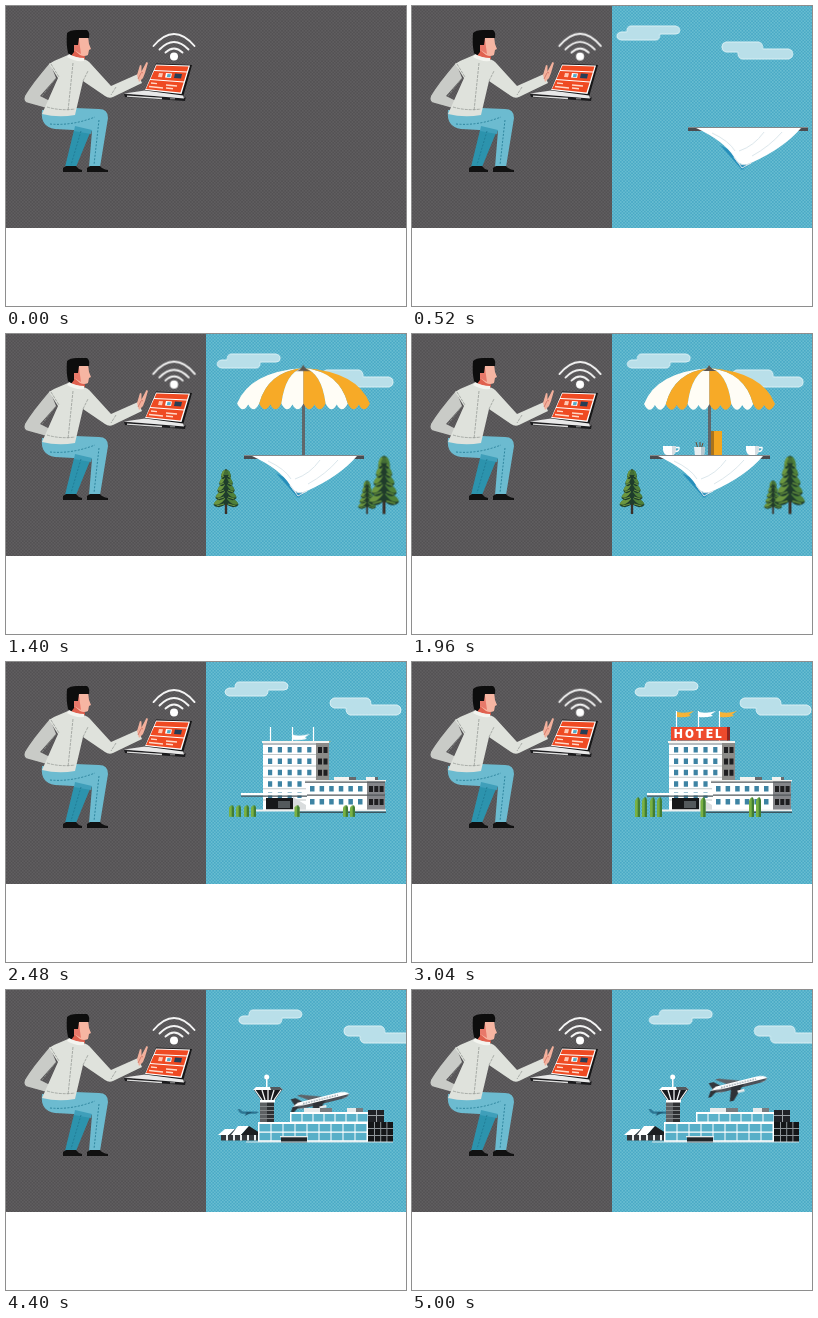
An HTML page that plays this animation: 400 by 300 pixels, repeating every 5.04 s.

```html
<!DOCTYPE html>
<html lang="en">
<head>
<meta charset="utf-8">
<title>Booking online</title>
<style>
html, body { margin: 0; width: 100%; height: 100%; overflow: hidden; background: #fff; }
svg { display: block; }
.grow, .pop { transform-box: fill-box; transform-origin: 50% 100%; }
#clouds { animation: drift 5040ms linear infinite; }
@keyframes drift { to { transform: translateX(36.500px); } }
#wifi { transform-origin: 168px 50px; animation: pulse 630ms ease-in-out infinite; }
@keyframes pulse { 50% { transform: scale(1.04); } }
text { font: 900 11.500px Inter, Arial, sans-serif; letter-spacing: 2.300px; }
</style>
</head>
<body>
<svg width="400" height="300" viewBox="0 0 400 300">
<defs>
  <pattern id="grayDots" width="3.200" height="3.200" patternUnits="userSpaceOnUse">
    <rect width="3.200" height="3.200" fill="#535153"/>
    <path d="M0 0h1.600v1.600H0zM1.600 1.600h1.600v1.600H1.600z" fill="#605e60"/>
  </pattern>
  <pattern id="blueDots" width="3.200" height="3.200" patternUnits="userSpaceOnUse">
    <rect width="3.200" height="3.200" fill="#49a9c5"/>
    <path d="M0 0h1.600v1.600H0zM1.600 1.600h1.600v1.600H1.600z" fill="#69bdd1"/>
  </pattern>
  <clipPath id="half"><rect x="200" width="200" height="222"/></clipPath>
  <g id="tree"></g>
  <g id="cup">
    <path d="M0 0h13v4q-1 5-4 5H4q-3 0-4-5z" fill="#fff"/>
    <path d="M13 1.500h3q1 4-4 4" fill="none" stroke="#fff" stroke-width="1.300"/>
    <path d="M9 0h4v4q-1 5-4 5z" fill="#d5dee3"/>
    <path d="M-2 9h17l-3 1.500H1z" fill="#f3f5f5"/>
  </g>
  <g id="shrub"><path d="M0 20V4q2.500-7 5 0v16z" fill="#79b143"/><path d="M2.700 20V0q1.800 0 2.300 4v16z" fill="#417d35"/></g>
  <path id="flag" d="M0 0q8 2 17-1l-5 3.500 2 1.500q-8 2-14 1z"/>
</defs>

<rect width="400" height="222" fill="url(#grayDots)"/>

<g id="man">
  <path d="M69 120l17 2-16 39H59z" fill="#2c93ad"/>
  <path d="M36 104q-2 17 13 19l37 2-3 36h11l8-49q0-9-9-9l-24-1z" fill="#6cbbd0"/>
  <path d="M69 120l17 4-1 4-17-3z" fill="#3f9fba"/>
  <path d="M75 125l-10 34M93 114l-5 45M44 118q22 2 45-7" fill="none" stroke="#1f7891" stroke-width=".8" stroke-dasharray="2 1.500"/>
  <path d="M57 166v-4l3-2h10q2 3 6 4v2zM81 166v-4l3-2h10q2 3 8 4v2z" fill="#111"/>
  <path d="M65 44h13l1 9-13 1z" fill="#e0614f"/>
  <path d="M68 30h14l1 8 2 5-2 1-1 5q-4 2-8 0l-6-5z" fill="#f6b5a2"/>
  <path d="M68 34h5l2 14-7-4z" fill="#e8796a"/>
  <path d="M61 27q3-3 10-3h10q3 2 2 8H73l-1 7h-4v7l-3 4-3-3q-2-9-1-20z" fill="#0d0d0d"/>
  <path d="M44 57Q26 78 19 90q-2 6 4 7l18 5 5-6-12-6 16-18z" fill="#c9cbc7"/>
  <path d="M62 49l-14 6-5 3 9 14-16 36q16 4 33 1l8-34 22 15q4 3 8 1l29-14-4-9-27 12-20-22q-3-4-8-5z" fill="#dfe2dc"/>
  <path d="M63 48l-2 3q8 5 17 4v-3q-8 0-15-4z" fill="#f3f4ef"/>
  <path d="M50 72L36 90M77 75l5-10M67 57l-5 48M110 81l-5 8M41 101q13 4 28 2M45 58l8 13" fill="none" stroke="#8f928e" stroke-width=".7" stroke-dasharray="3 1"/>
  <path d="M131 69l3-10 1.500.4v6l5-9.400 1.500.7-3 10.300-2 5-4 4z" fill="#f3b09c"/>
  <path d="M132 73l3-6M135 66l2 1" stroke="#c9685a" stroke-width=".7"/>
</g>

<g id="laptop">
  <path d="M150 57.500l36 1.500-9 32-39-5z" fill="#161617"/>
  <path d="M150 58.500l34 1-8.500 28.500-36.500-4z" fill="#fff"/>
  <path d="M150.500 59.500l32 1-8 26-34.500-3.500z" fill="#ef4a22"/>
  <path d="M148 64.500l33 1.500M144 73.500l34 2.500" stroke="#fff" stroke-width="1.200"/>
  <path d="M153 67l4 .3-1 4-4-.4z" fill="#ffc7b2"/>
  <path d="M160 67l6 .4-1 4.500-6-.5z" fill="#fff"/>
  <path d="M161.500 68l3.500.3-.7 3-3.500-.4z" fill="#53aac7"/>
  <path d="M169 67.500l7 .5-1 4.500-7-.5z" fill="#263e56"/>
  <path d="M145 77l6 .6M143 80.500l14 1.500M160 79l11 1M160 82l7 .7" stroke="#ffd9c8" stroke-width="1.400"/>
  <path d="M118 88l61 4 1-2-1 5-60-4z" fill="#1b1b1d"/>
  <path d="M118 87.500l21-3 38 5 1 3z" fill="#e9e9e9"/>
  <path d="M121 90.200l35 2.300" stroke="#ddd" stroke-width="1.300"/>
  <path d="M164 92.800h5" stroke="#bbb" stroke-width=".8"/>
</g>

<g id="wifi" fill="none" stroke="#f4f4f4" stroke-width="1.900" stroke-linecap="round">
  <circle cx="168" cy="50.500" r="4" fill="#fff" stroke="none"/>
  <path d="M159.500 46.500q8.500-8 17 0M153.500 43.500q14.500-15 29 0M147.500 40q20.500-24 41 0"/>
</g>

<g clip-path="url(#half)">
<g id="panel">
  <rect x="200" width="200" height="222" fill="url(#blueDots)"/>

  <g id="clouds" fill="#b9dfe9" stroke="#d9eff4">
    <path d="M215 20h45q4 1 4 4 0 4-4 4h-16q0 6-4 6h-35q-4-1-4-4t4-4h6q0-6 4-6z"/>
    <path d="M310 36h33q4 1 4 7h26q4 1 4 5t-4 5h-47q-4-1-4-7h-12q-4-1-4-5t4-5z"/>
  </g>

  <g id="cafe">
    <g id="treeA" class="grow"><use href="#tree" transform="translate(220 180)"/></g>
    <g id="treeB" class="grow"><use href="#tree" transform="translate(361 180) scale(.72 .75)"/></g>
    <g id="treeC" class="grow"><use href="#tree" transform="translate(378 180) scale(1.200 1.300)"/></g>
    <g id="parasol" class="grow">
      <path d="M296 34h3v88h-3z" fill="#60676b"/>
      <g id="canopy"></g>
    </g>
    <g id="cap" class="pop"><path d="M290 37q5-1 7-6 3 5 8 6z" fill="#5c564e"/></g>
    <g id="goods" class="pop">
      <path d="M299 97h11v25h-11z" fill="#f2a51f"/><path d="M299 97h3v25h-3z" fill="#a9731c"/>
      <path d="M284 108l2 7m2-7v7m3-6l-2 6" stroke="#6d4b32"/>
      <path d="M282 113h11l-1 9h-9z" fill="#e9eff1"/><path d="M289 113h4l-1 9h-3z" fill="#b8c8cf"/>
      <use href="#cup" x="251" y="112"/><use href="#cup" x="334" y="112"/>
    </g>
    <g id="cloth">
      <path d="M238 121h120v4H238z" fill="#4b4c50"/>
      <path d="M238 121h120v1H238z" fill="#83878a"/>
      <path d="M270 139l22 25 10-8z" fill="#278fbb"/>
      <path d="M246 122h105q-17 20-50 35-11 5-17-6-10-16-38-29z" fill="#fff"/>
      <path d="M284 151q6 12 17 6l-9 5zM314 126q-10 14-25 19M332 126q-12 14-30 24M262 127q17 8 23 18" fill="none" stroke="#dce7ec"/>
    </g>
  </g>

  <g id="hotel">
    <g id="sign">
      <g id="poles"><path d="M264.500 49v32M286.500 49v32M307.500 49v32" stroke="#fff" stroke-width="1.200"/></g>
      <g id="flagsOuter" fill="#f6b338"><use href="#flag" x="265" y="50"/><use href="#flag" x="308" y="50"/></g>
      <g id="flagMid" fill="#fff"><use href="#flag" x="287" y="50"/></g>
      <path d="M259 65h57v13.500h-57z" fill="#ee4a2c"/><path d="M315 65h3v13.500h-3z" fill="#8e2520"/>
      <text x="262" y="76" fill="#fff">HOTEL</text>
    </g>
    <g id="block" class="grow">
      <path d="M309 80h14v67h-14z" fill="#8b8b88"/>
      <path d="M257 79h53v69h-53z" fill="#fff"/><path d="M256 79h67v2h-67z" fill="#f5f5f2"/>
      <path d="M257 81.500h53v1h-53z" fill="#6f7b82"/>
      <path data-grid="262 85 4.200 5.500 5 5 9.800 11.400" fill="#3d83a3"/>
      <path data-grid="257 92 53 1 1 5 0 11.400" fill="#c3c9ca"/>
      <path data-grid="312 85 4 6 2 3 5.500 11.400" fill="#1e1e20"/>
      <path d="M300 118h61v31h-61z" fill="#fff"/><path d="M361 118h18v31h-18z" fill="#85868a"/>
      <path d="M328 115h22v3h-22zM360 115h9v3h-9z" fill="#f3f3f0"/><path d="M343 115h7v3h-7zM369 115h3v3h-3z" fill="#66696c"/>
      <path d="M299 118h81v1.500h-81z" fill="#efefec"/><path d="M299 119.500h80v1.200h-80zM301 132.500h78v1.200h-78z" fill="#53585c"/>
      <path data-grid="304 124 4.500 5.500 6 2 9.600 13" fill="#3d83a3"/>
      <path data-grid="363 124 4 6 3 2 5.300 13" fill="#1e1e20"/>
      <path d="M235 131h66v2.500h-66z" fill="#fff"/><path d="M235 133.500h66v1.200h-66z" fill="#47545b"/>
      <path d="M260 136h27v11.500h-27z" fill="#17181a"/><path d="M272 139h12v7h-12z" fill="#54595c"/>
      <path d="M287 135l13 8v5h-13z" fill="#d9dcdd"/>
      <path d="M249 147.500h131v2H249z" fill="#edf0ef"/><path d="M289 149.500h91v1.500h-91z" fill="#395660"/>
    </g>
    <g id="shrubs" class="grow">
      <use href="#shrub" x="223" y="135"/><use href="#shrub" x="230" y="135"/><use href="#shrub" x="238" y="135"/><use href="#shrub" x="245" y="135"/>
      <use href="#shrub" x="288.500" y="135"/><use href="#shrub" x="337" y="135"/><use href="#shrub" x="344" y="135"/>
    </g>
  </g>

  <g id="airport">
    <g id="taxi"><path d="M195 119h2l3 2.500h13q3 0 3 1l-3 1.200h-14q-3-1-4-4.700z" fill="#2d7593"/><path d="M204 122h6l-8 4z" fill="#225a74"/></g>
    <g id="jet"><g transform="translate(327 95) rotate(-14)">
      <path d="M5-3l-23-8h-4l13 9z" fill="#5d6267"/>
      <path d="M-29-9h5l8 7-10 2z" fill="#34383d"/>
      <path d="M-29-1l6-3h41q9 0 11 4-2 3-9 3h-34q-11 0-15-4z" fill="#fff"/>
      <path d="M-29-1l15 1h43q-2 3-9 3h-34q-11 0-15-4z" fill="#4c5158"/>
      <path d="M-18-1.800h36" stroke="#5f7480" stroke-width="1" stroke-dasharray="1.500 1.200"/>
      <path d="M5 0l-14 14h-4l5-14zM-22 0l-8 5h-3l4-6z" fill="#2e3237"/>
      <path d="M-3 5h7v2.500h-7z" fill="#e7eaeb"/>
    </g></g>
    <g id="radar"><path d="M260 87h1.500v13H260z" fill="#fff"/><circle cx="260.700" cy="87" r="2.500" fill="#fff"/></g>
    <g id="tower" class="grow">
      <path d="M254 110h14v30h-14z" fill="#5d6063"/><path d="M261 110h7v30h-7z" fill="#2e3033"/>
      <path data-grid="254 116 14 1 1 5 0 4" fill="#85898b"/>
      <path d="M248 100h28l-7 10h-14z" fill="#17191c"/>
      <path d="M249 100l7 10M256 100l3 10M262 100v10M268 100l-3 10M275 100l-7 10" stroke="#eef3f4" stroke-width="1.300"/>
      <path d="M250 97h24l3 3h-30z" fill="#fff"/><path d="M264 97h10l3 3h-12z" fill="#54595d"/>
      <path d="M254 110h15v2.500h-15z" fill="#fff"/>
    </g>
    <g id="halls" class="grow">
      <path d="M215 144h39v6.500h-39z" fill="#33373b"/>
      <path data-grid="220 145 2 5.500 5 1 7 0" fill="#e9eeef"/>
      <path d="M212 145l7-6h10l-6 6z" fill="#fff"/><path d="M223 145l6-6 7 6z" fill="#3a3e42"/>
      <path d="M225 145l7-9h11l-8 9z" fill="#fff"/><path d="M235 145l8-9 11 7v2z" fill="#1c1e21"/>
    </g>
    <g id="terminal" class="grow">
      <path d="M298 118h28v4h-28zM341 118h16v4h-16z" fill="#e6eaeb"/><path d="M314 118h12v4h-12zM350 118h7v4h-7z" fill="#777c80"/>
      <path d="M284 122h78v12h-78z" fill="#fff"/><path d="M362 120h16v13h-16z" fill="#202226"/>
      <path data-grid="285.500 124 10 7.500 7 1 11 0" fill="#5bb2ca"/>
      <path d="M252 132h110v20H252z" fill="#fff"/><path d="M362 132h25v20h-25z" fill="#141618"/>
      <path data-grid="253.500 134 11 7.500 9 2 12 8.800" fill="#57afc8"/>
      <path data-grid="368 132 1 20 3 1 6.200 0" fill="#8d9498"/>
      <path data-grid="362 138 25 1 1 2 0 7" fill="#8d9498"/>
      <path d="M362 125h16v1h-16zM370 120h1v12h-1z" fill="#9ba1a5"/>
      <path d="M275 147h26v5.500h-26z" fill="#22262a"/><path d="M274 146h28v1.300h-28z" fill="#e8eded"/>
      <path d="M240 151.500h147v1H240z" fill="#d6e4e8"/>
    </g>
  </g>
</g>
</g>
</svg>
<script>
const LOOP = 5040;
const $ = id => document.getElementById(id);
const pct = ms => (ms / LOOP * 100).toFixed(2) + '%';
let css = '';

function tween(id, from, to, start, end, ease = 'cubic-bezier(.2,.8,.3,1)') {
  css += `@keyframes ${id}{0%,${pct(start)}{${from};animation-timing-function:${ease}}
    ${pct(end)},100%{${to}}}#${id}{animation:${id} ${LOOP}ms linear infinite}`;
}
const grow = (id, start, end) =>
  tween(id, 'transform:scaleY(0)', 'transform:none', start, end, 'cubic-bezier(.2,.8,.4,1.15)');
const pop = (id, start, end) =>
  tween(id, 'transform:scale(0)', 'transform:none', start, end, 'cubic-bezier(.2,.8,.4,1.2)');
const slide = (id, x, y, start, end, ease) =>
  tween(id, `transform:translate(${x}px,${y}px)`, 'transform:none', start, end, ease);

// Hard cut: an element is visible only from start to end.
function show(id, start, end) {
  css += `@keyframes ${id}On{0%{visibility:${start ? 'hidden' : 'visible'}}
    ${start ? pct(start) + '{visibility:visible}' : ''}${pct(end)}{visibility:hidden}}
    #${id}{animation:${id}On ${LOOP}ms step-end infinite}`;
}

for (const el of document.querySelectorAll('[data-grid]')) {
  const [x, y, w, h, nx, ny, dx, dy] = el.dataset.grid.split(' ').map(Number);
  let d = '';
  for (let r = 0; r < ny; r++)
    for (let c = 0; c < nx; c++) d += `M${x + c * dx} ${y + r * dy}h${w}v${h}h${-w}z`;
  el.setAttribute('d', d);
}

// Conifer: tiers of drooping boughs around a trunk.
let boughs = '<path d="M-1.200-42h2.400V0h-2.400z" fill="#3a3029"/>';
for (let i = 0; i < 5; i++) {
  const y = -11 - i * 7, w = 12.5 - i * 1.9;
  for (const s of [-1, 1])
    boughs += `<g transform="translate(0 ${y}) scale(${s} 1)">
      <path d="M0-6Q${w * .8}-5 ${w} 2Q${w * .6} 7 0 1z" fill="#1f3d2c"/>
      <path d="M1-5Q${w * .8}-5 ${w} 1Q${w * .6} 4 1-4z" fill="${s < 0 ? '#6b963f' : '#4f8039'}"/>
      <path d="M2 1l${w * .6} 2" stroke="#6b963f"/></g>`;
}
$('tree').innerHTML = boughs + '<path d="M-3-39L0-45l3 6z" fill="#456f36"/>';

function rib(i, open) {
  const u = (i - 3) / 3;
  return open
    ? { x: 297.5 + u * 65.5, y: 70, cx: 297.5 + u * 53, cy: 38 }
    : { x: 297.5 + u * 9, y: 99 + i % 2 * 3, cx: 297.5 + u * 4, cy: 60 };
}
function gore(i, open) {
  const a = rib(i, open), b = rib(i + 1, open), tip = open ? 34 : 38;
  const mx = (a.x + b.x) / 2, my = (a.y + b.y) / 2 + 1;
  const dip = open ? 11 : 4;
  return `M297.5 ${tip}Q${a.cx} ${a.cy} ${a.x} ${a.y}Q${(a.x + mx) / 2} ${a.y + dip} ${mx} ${my}` +
    `Q${(b.x + mx) / 2} ${b.y + dip} ${b.x} ${b.y}Q${b.cx} ${b.cy} 297.5 ${tip}Z`;
}
for (let i = 0; i < 6; i++) {
  const fill = i % 2 ? '#f7aa27' : '#fffdf6';
  $('canopy').innerHTML += `<path id="gore${i}" d="${gore(i, true)}" fill="${fill}"/>`;
  tween('gore' + i, `d:path("${gore(i, false)}")`, `d:path("${gore(i, true)}")`,
    1060, 1600, 'cubic-bezier(.3,.7,.3,1.15)');
}

slide('panel', 200, 0, 10, 460);
show('cafe', 0, 2200);
grow('treeA', 560, 860);
grow('treeB', 680, 980);
grow('treeC', 620, 920);
slide('cloth', 160, 0, 420, 780);
grow('parasol', 720, 980);
pop('cap', 1240, 1500);
pop('goods', 1500, 1820);

show('hotel', 2200, 3340);
grow('block', 2200, 2420);
slide('poles', 0, 16, 2320, 2440);
slide('flagMid', 0, 16, 2400, 2540, 'linear');
slide('flagsOuter', 0, 16, 2460, 2620, 'linear');
slide('sign', 0, 16, 2500, 2760);
tween('shrubs', 'transform:scaleY(0)', 'transform:none', 2340, 2680, 'ease-out');

show('airport', 3340, LOOP);
grow('terminal', 3340, 3580);
grow('halls', 3400, 3640);
grow('tower', 3460, 3720);
slide('radar', 0, 16, 3700, 3960);
slide('jet', -30, 40, 3960, 5000, 'ease-out');
tween('taxi', 'transform:none', 'transform:translateX(42px)', 0, LOOP, 'linear');

document.head.appendChild(document.createElement('style')).textContent = css;
</script>
</body>
</html>
```
